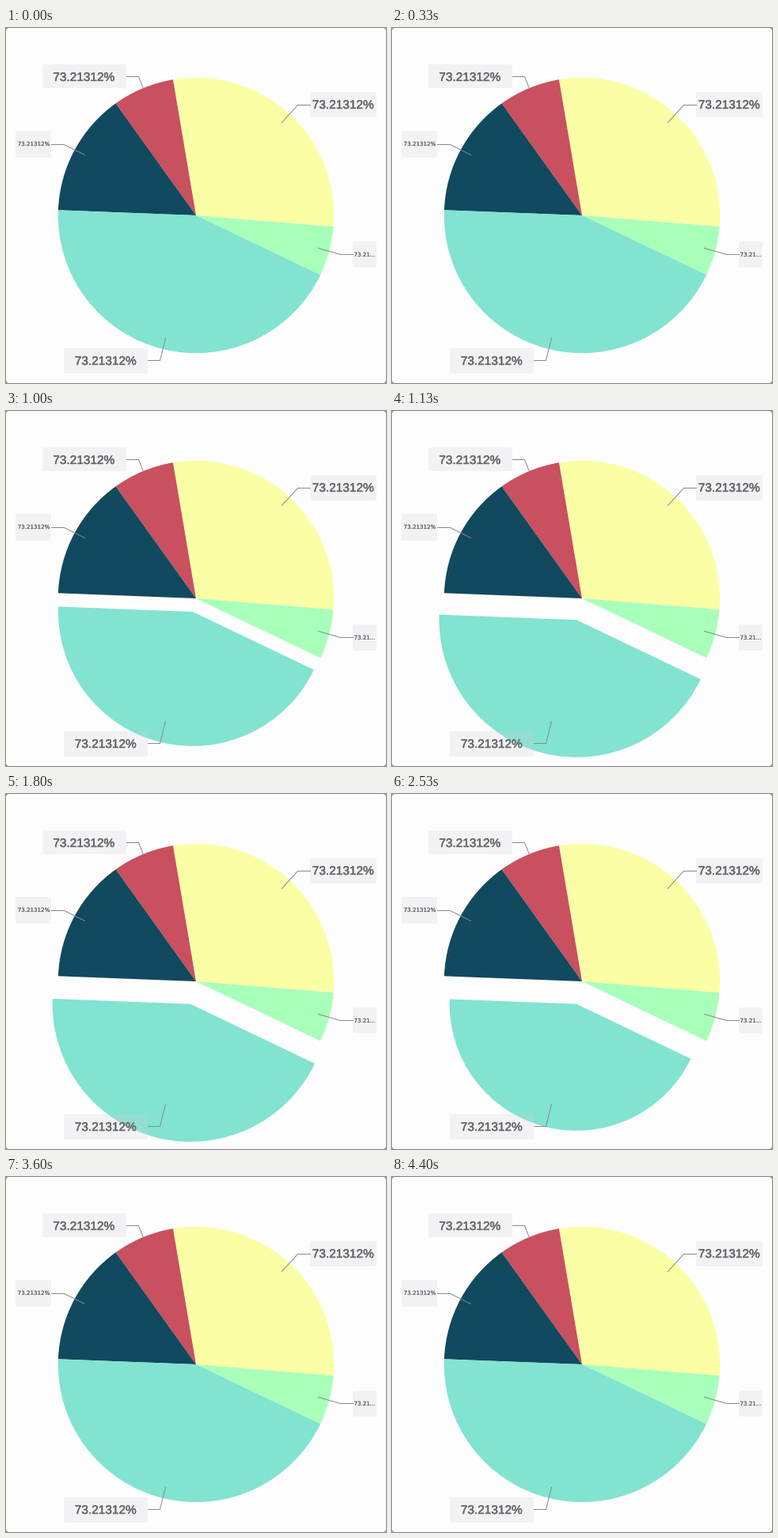
A matplotlib script that plays this animation: 480 px wide and 449 px high, repeating every 4.59 s.

```python
import numpy as np
import matplotlib.pyplot as plt
from matplotlib.animation import FuncAnimation
from matplotlib.patches import FancyBboxPatch, Wedge
from matplotlib.patheffects import withStroke

W, H, DPI = 480, 449, 64
LOOP, STEP = 4590, 30
TICK = 1000 / 15            # the picture refreshes 15 times a second

CENTER = np.array([240, 237])
RADIUS = 174.2
SHIFT = 29.5                # how far the selected slice slides out
SHRINK = 0.083              # size lost while pressed
PRESSES = [(817, 905), (2280, 2760)]   # touch down, touch up

INK = "#66666b"
LINE = "#858a8d"


def px(size):
    return size * 72 / DPI


fig = plt.figure(figsize=(W / DPI, H / DPI), dpi=DPI, facecolor="#8c8c8c")
ax = fig.add_axes([0, 0, 1, 1])
ax.set_xlim(0, W)
ax.set_ylim(H, 0)
ax.axis("off")


def add_box(x0, y0, x1, y1, radius, color, z):
    style = f"round,pad=0,rounding_size={radius}"
    ax.add_patch(FancyBboxPatch((x0, y0), x1 - x0, y1 - y0, boxstyle=style,
                                facecolor=color, linewidth=0, zorder=z))


def add_slice(start, end, color):
    # Angles run counter-clockwise on screen; the y axis points down.
    wedge = Wedge(CENTER, RADIUS, -end, -start, facecolor=color, linewidth=0)
    return ax.add_patch(wedge)


def add_label(box, text, center, size, font, weight, path):
    add_box(*box, 1.5, (0.82, 0.82, 0.855, 0.23), 3)
    xs, ys = np.array(path).T + 0.5
    ax.plot(xs, ys, color=LINE, lw=px(1), zorder=4)
    ax.text(*center, text, fontsize=px(size), family=font, color=INK,
            ha="center", va="center_baseline", zorder=5,
            path_effects=[withStroke(linewidth=px(weight), foreground=INK)])


def spring(ms):
    """Critically damped step response, 0 to 1."""
    x = 0.021 * max(ms, 0)
    return 1 - (1 + x) * np.exp(-x)


add_box(0, 0, W, H, 4, "#fdfdfd", 0)

add_slice(-4.7, 99.6, "#faffa5")
add_slice(99.6, 125.6, "#c9505f")
add_slice(125.6, 177.8, "#11495f")
add_slice(-25.6, -4.7, "#a8ffba")
FROM, TO = 177.8, 334.4
moving = add_slice(FROM, TO, "#81e3d0")
mid = np.radians((FROM + TO) / 2)
outward = np.array([np.cos(mid), -np.sin(mid)])

FULL = "73.21312%"
BIG = (15.4, "Liberation Sans", 0.45)
SMALL = (7.1, "DejaVu Sans", 0.1)
add_label((46, 46, 152, 76), FULL, (98, 61.5), *BIG,
          [(152, 61), (167, 61), (173, 76)])
add_label((384, 81, 468, 113), FULL, (425.5, 96.5), *BIG,
          [(384, 97), (368, 97), (348, 119)])
add_label((12, 130, 57, 164), FULL, (35, 146.5), *SMALL,
          [(57, 147), (73, 147), (99, 160)])
add_label((438, 270, 468, 303), "73.21...", (453, 286.5), *SMALL,
          [(438, 286), (422, 286), (394, 278)])
add_label((73, 405, 179, 437), FULL, (125.5, 420.5), *BIG,
          [(179, 420), (194, 420), (201, 392)])


def draw(frame):
    t = TICK * int((frame * STEP + 24) / TICK)
    pressed = sum(spring(t - down) - spring(t - up) for down, up in PRESSES)
    (_, opened), (_, closed) = PRESSES
    slide = SHIFT * (spring(t - opened) - spring(t - closed))
    moving.set_center(CENTER + slide * outward)
    moving.set_radius(RADIUS * (1 - SHRINK * pressed))
    return [moving]


anim = FuncAnimation(fig, draw, frames=LOOP // STEP, interval=STEP,
                     repeat=True, repeat_delay=0, blit=False)
plt.show()
```
